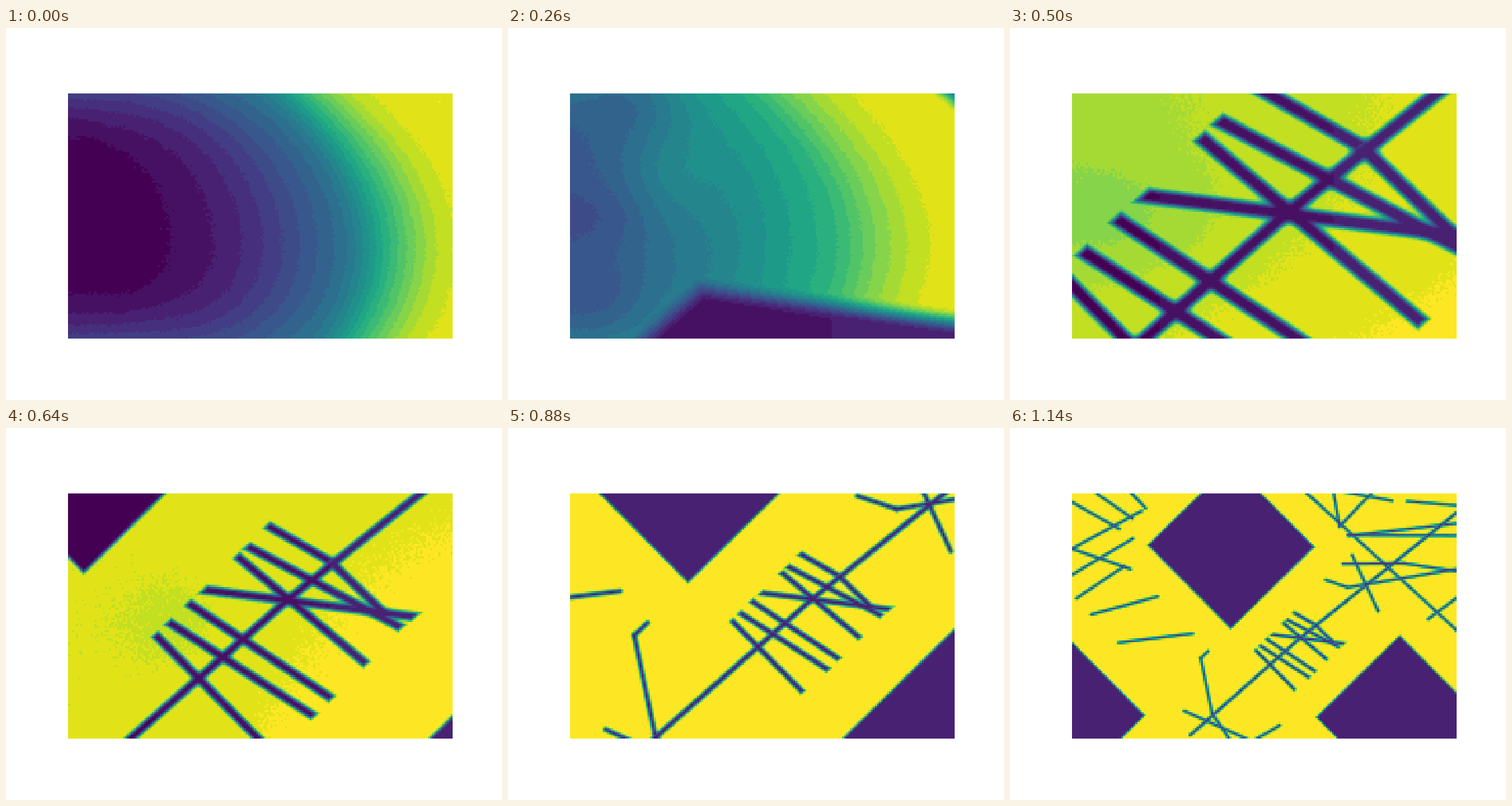
A matplotlib script for the animation above (1160 ms loop, 864x648 px).

```python
import numpy as np
import matplotlib.pyplot as plt
from matplotlib.animation import FuncAnimation

FRAMES, STEP_MS = 58, 20
COLS, ROWS = 188, 120
LEVELS = 22
CENTER = np.array([443.0, 327.0])

# Camera keys: time, zoom and the ground point in the middle of the view
KEYS = np.array([0, 9, 17, 25, 32, 44, 57], float)
ZOOM = np.array([14, 9, 5.5, 1.725, 1, 0.61, 0.342])
LOOK = [(-166, -59), (-151, -46), (-96, -29), (-24, 3.5),
        (-48, 28), (-143, 48), (-184, -112.5)]

# Tape around the central crossing
SPINE = [(-561, 495), (0, 0), (795, -636)]
RIBS = [
    [(-36, -129), (74, -66), (170, 26)],
    [(-71, -93), (197, 49)],
    [(-89, -76), (136, 112)],
    [(-147, -17), (221, 30)],
    [(-174, 6), (76, 172)],
    [(-208, 39), (45, 203)],
    [(-231, 61), (-28, 266)]]
CUT = np.array([0.667, 0.745])

# Outer tape, in stage pixels of the highest view
OUTER = [
    [(345, 389), (332, 401), (352, 497), (383, 543)],
    [(304, 493), (420, 545)],
    [(470, 518), (425, 544)],
    [(190, 374), (318, 358)],
    [(142, 325), (257, 294)],
    [(100, 208), (210, 246)],
    [(505, 103), (785, 359)],
    [(562, 105), (574, 172), (634, 109)],
    [(590, 188), (785, 166)],
    [(588, 187), (778, 188)],
    [(580, 237), (685, 236), (785, 251)],
    [(550, 265), (588, 278), (785, 245)],
    [(596, 222), (641, 319)],
    [(728, 333), (785, 291)]]
for i in range(3):
    OUTER.append([(100 + 52 * i, 125 - 10 * i), (190 + 23 * i, 176 - 18 * i)])
    OUTER.append([(100 + 8 * i, 215 + 41 * i), (229 - 15 * i, 145 + 48 * i)])
for i in range(2):
    OUTER.append([(575 + 117 * i, 110 + 18 * i), (665 + 120 * i, 127 + 9 * i)])

# Plain dark boards on a tilted square lattice
EDGES = np.array([(143, 146), (-144, 143)], float)
BOARD = np.array([385, 206])
BOARD_GAP = 2.05


def to_ground(points):
    return (np.array(points, float) - (506, 365.5)) * (1 / ZOOM[-1])


def curve(t, knots, values):
    """Smooth curve through values at knots; t may be an array."""
    knots, values = np.asarray(knots, float), np.asarray(values, float)
    slope = np.gradient(values, knots, axis=0)
    i = np.clip(np.searchsorted(knots, t, "right") - 1, 0, len(knots) - 2)
    span = knots[i + 1] - knots[i]
    w = np.clip((t - knots[i]) / span, 0, 1)
    ease = w * w * (3 - 2 * w)
    return (values[i] * (1 - ease) + values[i + 1] * ease
            + span * w * (1 - w) * (slope[i] * (1 - w) - slope[i + 1] * w))


def pairs(points):
    points = np.array(points, float)
    return list(zip(points[:-1], points[1:]))


U, V = np.meshgrid((np.arange(COLS) + 0.5) / COLS, (np.arange(ROWS) + 0.5) / ROWS)
PX = 108 + 669.6 * U - CENTER[0]
PY = 113.5 + 427.4 * V - CENTER[1]


def bowl(start, rise, fall, rim):
    """Dark on the left, bright beyond a curved edge, with lit left corners."""
    t = U - (start + rise * V - fall * V * V)
    value = curve(t, [-0.6, -0.35, -0.17, -0.05, 0.06, 0.18, 0.35],
                  [-0.01, 0.10, 0.26, 0.40, 0.67, 0.89, 0.97])
    return value + rim * (2 * V - 1) ** 4 * np.clip(-t / 0.6, 0, 1)


def spot(x, y, rx, ry):
    return np.exp(-((U - x) / rx) ** 2 - ((V - y) / ry) ** 2)


full = np.ones_like(U)
LIGHT = [
    bowl(0.555, 0.72, 0.57, 0.2),
    bowl(0.496, 0.80, 0.65, 0.25),
    0.56 + 0.4 * np.sin(U * np.pi / 2) + 0.14 * spot(0.27, 0.32, 0.12, 0.2)
    - 0.2 * spot(0.16, 0, 0.14, 0.18) - 0.1 * spot(0.05, 0.5, 0.15, 0.12)
    - 0.1 * spot(0.08, 0.88, 0.12, 0.2),
    0.86 + 0.09 * U + 0.05 * V * V - 0.06 * spot(0.1, 0.5, 0.25, 0.22),
    0.94 + 0.03 * U + 0.05 * U * V - 0.03 * spot(0.3, 0.55, 0.2, 0.3),
    full, full]

SPINE_SEGS = pairs(SPINE)
RIB_SEGS = [s for rib in RIBS for s in pairs(rib)]
OUTER_SEGS = [s for line in OUTER for s in pairs(to_ground(line))]
BOARDS = [to_ground(BOARD + BOARD_GAP * step) for step in (0 * EDGES[0], *EDGES)]


def capsule(x, y, a, b, half):
    d = b - a
    t = np.clip(((x - a[0]) * d[0] + (y - a[1]) * d[1]) / (d @ d), 0, 1)
    return np.hypot(x - a[0] - t * d[0], y - a[1] - t * d[1]) - half


def strip(x, y, a, b, half):
    """Straight tape whose ends are cut parallel to the spine."""
    d = (b - a) / np.hypot(*(b - a))
    side = np.abs((x - a[0]) * d[1] - (y - a[1]) * d[0]) - half
    along = x * CUT[0] + y * CUT[1]
    return np.maximum(side, np.maximum(a @ CUT - along, along - b @ CUT))


def board(x, y, mid):
    sides = []
    for edge in EDGES:
        size = np.hypot(*edge)
        offset = ((x - mid[0]) * edge[0] + (y - mid[1]) * edge[1]) / size
        sides.append(np.abs(offset) - size / ZOOM[-1] / 2)
    return np.maximum(*sides)


def distance(x, y, margin, web=2.0):
    """Distance to the dark shapes, blended so that crossings fill in."""
    low = np.array([x.min(), y.min()]) - margin
    high = np.array([x.max(), y.max()]) + margin
    gaps = [board(x, y, mid) for mid in BOARDS]
    for shape, segs, half in ((capsule, SPINE_SEGS, 6.5),
                              (strip, RIB_SEGS, 6.8),
                              (capsule, OUTER_SEGS, 5.5)):
        gaps += [shape(x, y, a, b, half) for a, b in segs
                 if (np.maximum(a, b) > low).all()
                 and (np.minimum(a, b) < high).all()]
    total = sum(np.exp(-np.clip(gap, -40, 80) / web) for gap in gaps)
    return -web * np.log(total)


def picture(k):
    zoom = 1 / curve(k, KEYS, 1 / ZOOM)
    look = curve(k, KEYS, LOOK)
    soft = 4.5 + 5.5 * zoom
    gap = zoom * distance(PX / zoom + look[0], PY / zoom + look[1],
                          10 + soft / zoom)
    cover = np.clip(0.5 - gap / soft, 0, 1)
    cover = cover * cover * (3 - 2 * cover)

    i = min(np.searchsorted(KEYS, k, "right") - 1, len(KEYS) - 2)
    w = (k - KEYS[i]) / (KEYS[i + 1] - KEYS[i])
    light = LIGHT[i] * (1 - w) + LIGHT[i + 1] * w
    light = light + np.random.default_rng(k).normal(0, 0.003, U.shape)
    late = np.clip((k - 32) / 12, 0, 1)
    dark = 0.1 * U * (1 - late) + 0.08 * late
    value = light * (1 - cover) + np.minimum(dark, light) * cover
    return np.round(np.clip(value, 0, 1) * LEVELS) / LEVELS


fig, ax = plt.subplots(figsize=(8.64, 6.48), dpi=100)
ax.axis("off")
image = ax.imshow(picture(0), cmap="viridis", vmin=0, vmax=1,
                  interpolation="nearest")


def update(k):
    image.set_data(picture(k))
    return [image]


anim = FuncAnimation(fig, update, frames=FRAMES, interval=STEP_MS, repeat=True)
plt.show()
```
